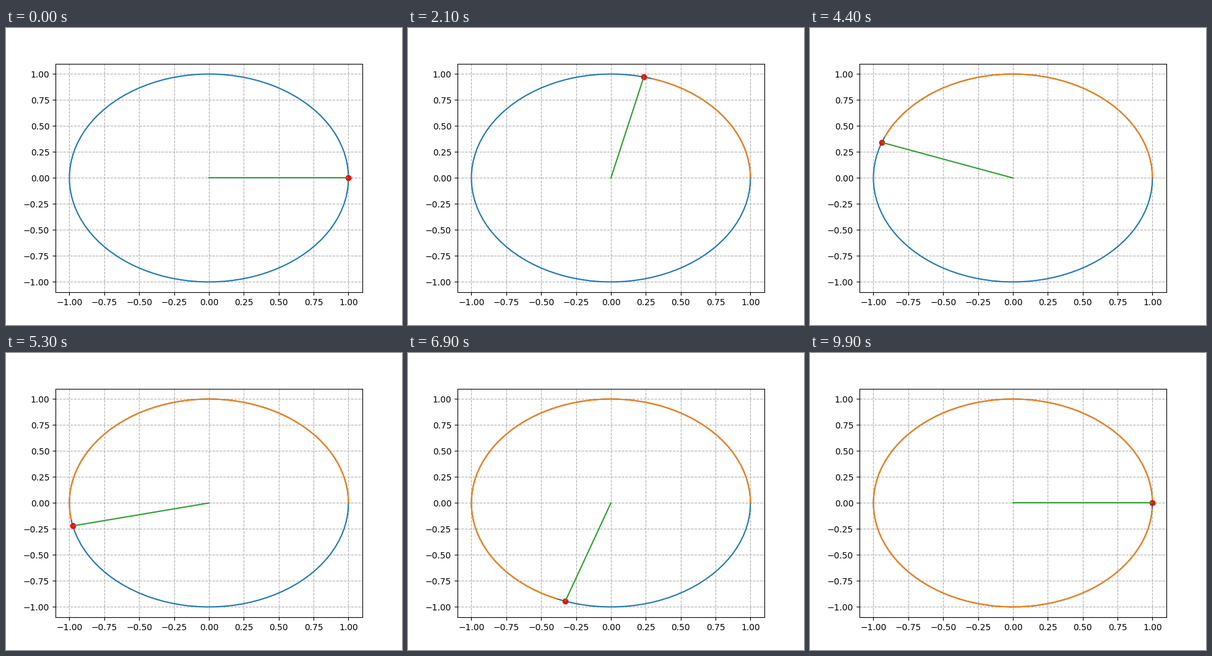
These frames come from a looping animation (640 px wide and 480 px high, 10 s). A matplotlib script:

```python
import numpy as np
import matplotlib.pyplot as plt
from matplotlib.animation import FuncAnimation

FRAMES = 100
INTERVAL = 100

theta = np.linspace(0, 2 * np.pi, FRAMES)
x, y = np.cos(theta), np.sin(theta)

fig, ax = plt.subplots(figsize=(6.4, 4.8), dpi=100)
ax.plot(x, y)
trail, = ax.plot([], [], color="C1")
dot, = ax.plot(x[:1], y[:1], "ro")
radius, = ax.plot([0, x[0]], [0, y[0]], color="C2")
ax.grid(ls="--")


def update(i):
    trail.set_data(x[:i], y[:i])
    dot.set_data(x[i:i + 1], y[i:i + 1])
    radius.set_data([0, x[i]], [0, y[i]])
    return trail, dot, radius


anim = FuncAnimation(fig, update, frames=FRAMES, interval=INTERVAL,
                     repeat=True, repeat_delay=0)
plt.show()
```
